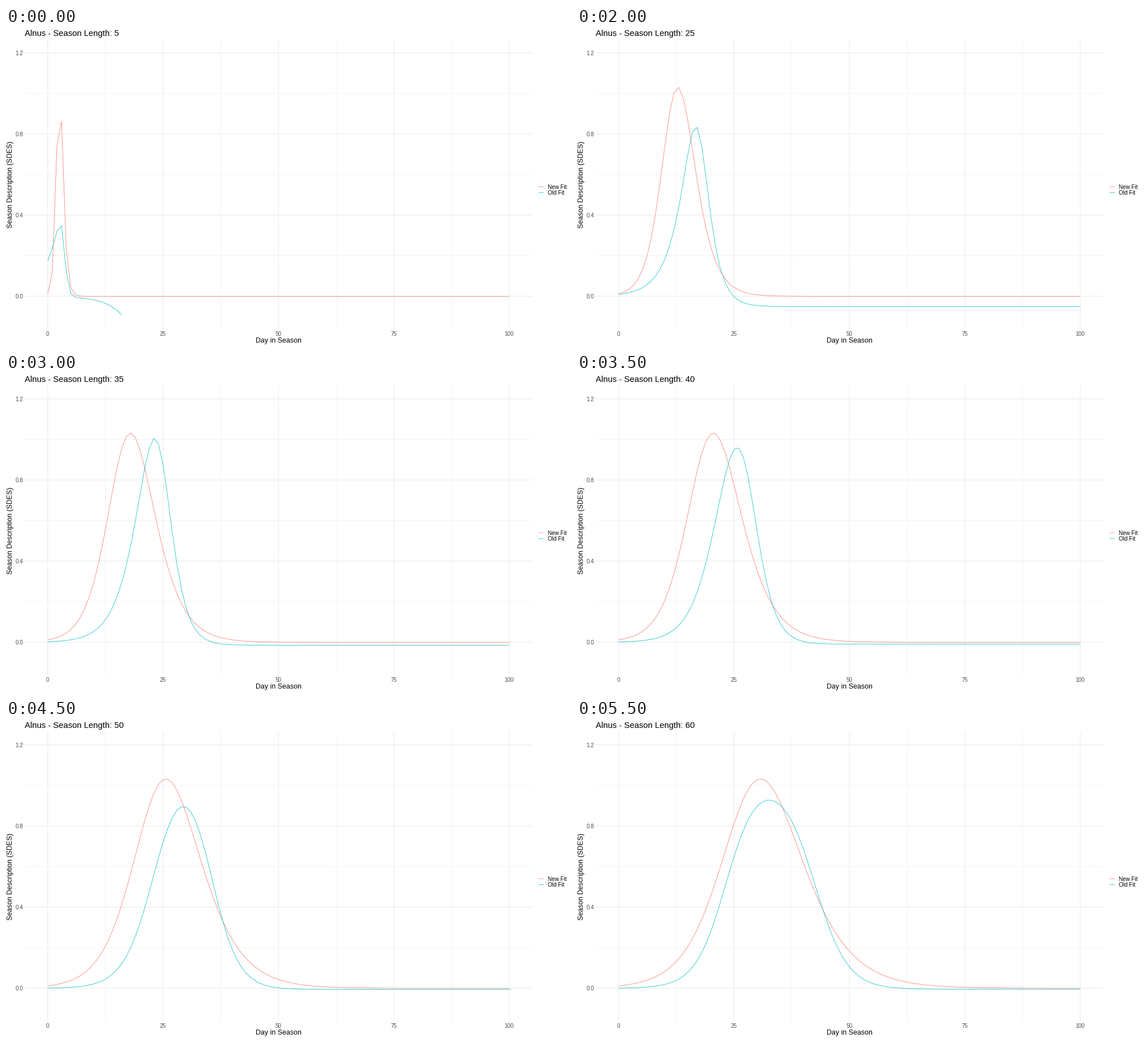
Animation, 998 px wide and 561 px high, one loop 6000 ms. Source, as a matplotlib script:

```python
import numpy as np
import matplotlib.pyplot as plt
from matplotlib.animation import FuncAnimation

W, H, DPI = 998, 561, 100
PT = 72 / DPI
RED, TEAL, GRID, TICK = "#F8766D", "#00BFC4", "#EBEBEB", "#4D4D4D"
CURVE_WIDTH = 0.75
LENGTHS = range(5, 61, 5)
DAYS = np.arange(101.0)
DAY_TICKS = range(0, 101, 25)
VALUE_TICKS = (0, 0.4, 0.8, 1.2)


def px(day):
    return 73.7 + 8.152 * np.asarray(day)


def py(value):
    return 473.3 - 357.9 * np.asarray(value)


def new_fit(length):
    """Rising times falling logistic, stretched with the season."""
    u = DAYS / length
    return 2.62 / ((1 + np.exp(5.38 - 12 * u)) * (1 + np.exp(9 * u - 4.92)))


def old_fit(length):
    """Exponential rise and fall with a flattened top, then a dip below zero."""
    rise_day = 23.3 - 3.25 * np.logaddexp(0, (39.7 - length) / 6.5)
    fall_day = 0.716 * length - 0.4 + 1.8 * np.exp(-((length - 34.5) / 12) ** 2)
    fall_rate = (14 + 2.9 * np.tanh((length - 31) / 5)) / length
    flatness = max(-0.2, 0.955 * np.sin(np.pi / 2 * (length - 25) / 35))

    log_up = 0.3 * (DAYS - rise_day)
    log_down = fall_rate * (fall_day - DAYS)
    hump = 1 / (np.exp(-log_up) + np.exp(-log_down) + flatness)

    # Short seasons dip ever faster; long ones settle just below zero.
    depth = min(0.09, 0.005 + 0.0455 * np.exp((25 - length) / 6.3))
    growth = 0.27 / (1 + np.exp((length - 17.5) / 0.72))
    onset = 1 / (1 + np.exp(log_down - log_up))
    dip = depth * np.exp(growth * (DAYS - 13 - 0.6 * length)) * onset

    value = hump - dip
    return np.where(value < -0.1, np.nan, value)


fig = plt.figure(figsize=(W / DPI, H / DPI), dpi=DPI, facecolor="white")
ax = fig.add_axes([0, 0, 1, 1])
ax.set_xlim(0, W)
ax.set_ylim(H, 0)
ax.axis("off")


def line(x, y, color, width):
    return ax.plot(x, y, color=color, lw=width * PT, solid_capstyle="butt",
                   solid_joinstyle="round", snap=False)[0]


def label(x, y, text, size, color="black", **kw):
    kw = {"ha": "left", "va": "baseline", **kw}
    return ax.text(x, y, text, fontsize=size * PT, color=color,
                   family="Liberation Sans", **kw)


def grid(days, values, width):
    for day in days:
        line([px(day)] * 2, py([-0.165, 1.265]), GRID, width)
    for value in values:
        line(px([-5, 105]), [py(value)] * 2, GRID, width)


grid(np.arange(12.5, 100, 25), (0.2, 0.6, 1.0), 0.6)
grid(DAY_TICKS, VALUE_TICKS, 1.1)

for day in DAY_TICKS:
    label(px(day), 543, str(day), 9.9, TICK, ha="center")
for value in VALUE_TICKS:
    label(30, py(value) + 3.7, f"{value:.1f}", 9.9, TICK, ha="right")

label(481.3, 555.3, "Day in Season", 12.38, ha="center")
label(8.3, 276.5, "Season Description (SDES)", 12.38,
      ha="center", va="center", rotation=90)

for y, name, color in ((280, "New Fit", RED), (290.6, "Old Fit", TEAL)):
    line([941, 949.6], [y, y], color, CURVE_WIDTH)
    label(956.7, y + 3.7, name, 9.9)

title = label(33, 13.8, "", 14.86)
new_line = line(px(DAYS), py(new_fit(LENGTHS[0])), RED, CURVE_WIDTH)
old_line = line(px(DAYS), py(old_fit(LENGTHS[0])), TEAL, CURVE_WIDTH)


def update(i):
    length = LENGTHS[i]
    title.set_text(f"Alnus - Season Length: {length}")
    new_line.set_ydata(py(new_fit(length)))
    old_line.set_ydata(py(old_fit(length)))
    return title, new_line, old_line


anim = FuncAnimation(fig, update, frames=len(LENGTHS), interval=500,
                     repeat=True, repeat_delay=0)
plt.show()
```
